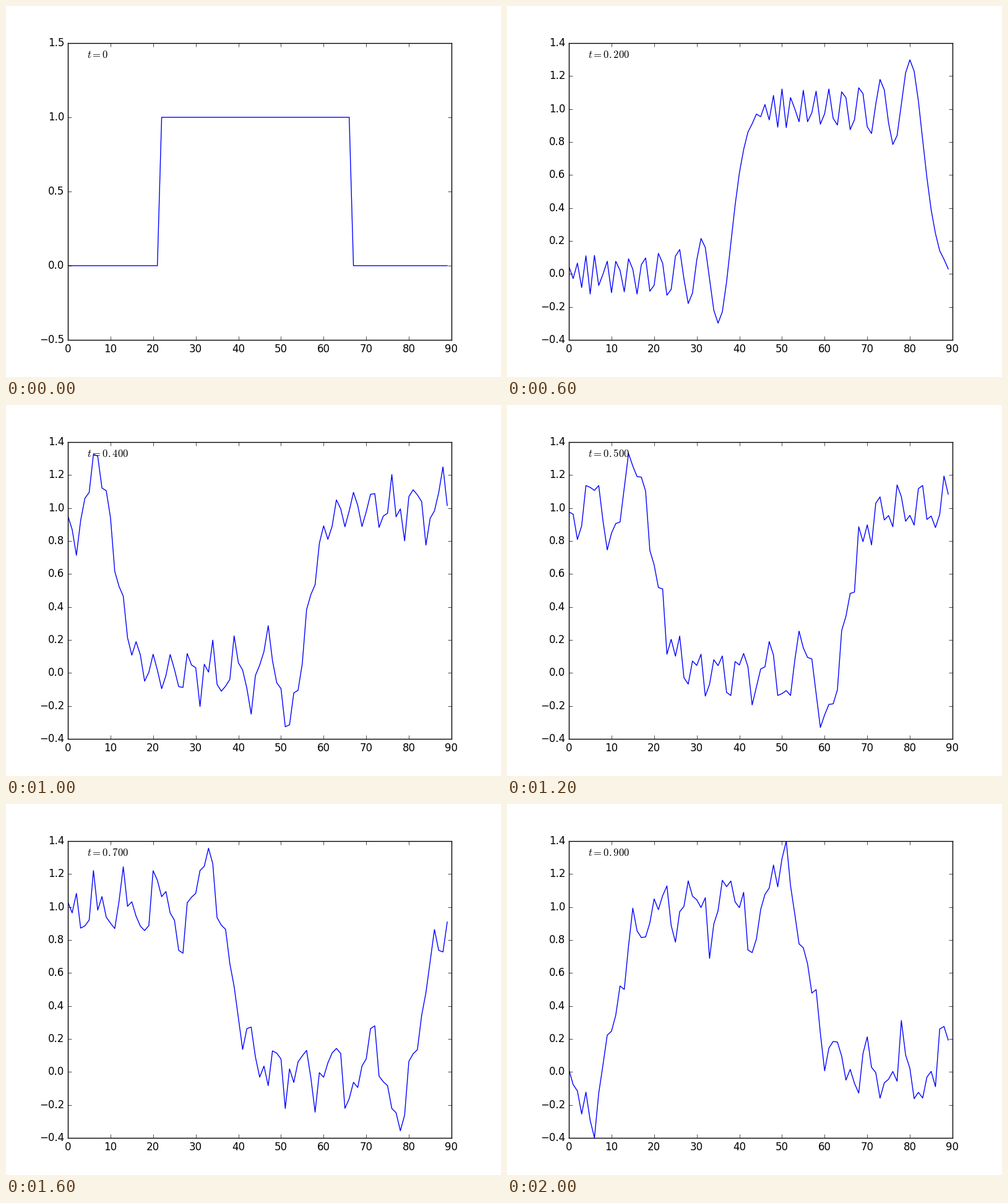
Animation, 800 px wide and 600 px high, one loop 2200 ms. Source, as a matplotlib script:

```python
import numpy as np
import matplotlib.pyplot as plt
from matplotlib.animation import FuncAnimation

plt.style.use("classic")
plt.rcParams.update({
    "figure.dpi": 100,
    "savefig.dpi": 100,
    "figure.facecolor": "white",
    "font.family": "DejaVu Sans",
    "mathtext.fontset": "cm",
})

N = 90            # grid cells on the periodic unit interval
DT = 0.01
COURANT = DT * N
STEPS = 10        # time steps between two pictures
FRAMES = 11
WIDE = (0, 7, 9)  # pictures that need the larger value range


def crank_nicolson():
    """One-step matrix for advection with central differences."""
    eye = np.eye(N)
    slope = np.roll(eye, 1, axis=1) - np.roll(eye, -1, axis=1)
    half = COURANT / 4 * slope
    return np.linalg.solve(eye + half, eye - half)


def solve():
    u = np.zeros(N)
    u[22:67] = 1
    step = crank_nicolson()
    states = [u]
    for n in range((FRAMES - 2) * STEPS + 1):
        u = step @ u
        if n % STEPS == 0:
            states.append(u)
    return states


def label(i):
    if i == 0:
        return "$t=0$"
    millis = (i - 1) * 100
    # the braces keep the small gap after the decimal point
    return f"$t=0.{{{millis:03d}}}$"


states = solve()

fig = plt.figure(figsize=(8, 6), dpi=100)
ax = fig.add_axes([0.125, 0.1, 0.775, 0.8])
ax.set_xlim(0, 90)
ax.set_xticks(range(0, 91, 10))
line, = ax.plot(np.arange(N), states[0], color="blue", lw=1)
note = ax.text(0.05, 0.95, "", transform=ax.transAxes, fontsize=12)


def draw(i):
    pad, gap = (0.5, 0.5) if i in WIDE else (0.4, 0.2)
    count = round((1 + 2 * pad) / gap) + 1
    ax.set_yticks(np.round(np.linspace(-pad, 1 + pad, count), 1))
    ax.set_ylim(-pad, 1 + pad)
    line.set_ydata(states[i])
    note.set_text(label(i))
    return line, note


anim = FuncAnimation(fig, draw, frames=FRAMES, interval=200,
                     init_func=lambda: draw(0), blit=False, repeat=True)
plt.show()
```
